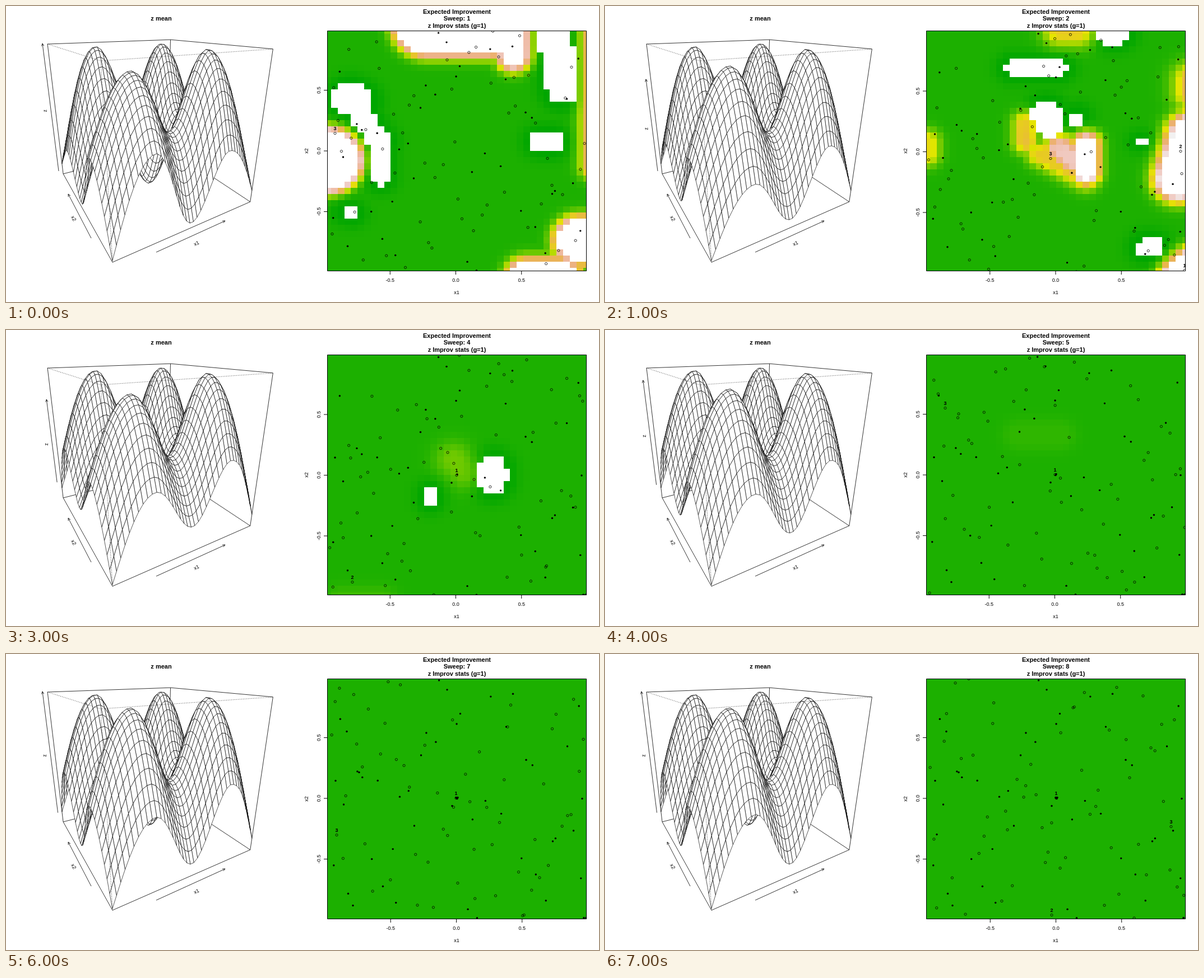
An HTML page with a canvas that plays this animation: 1058 by 529 pixels, repeating every 8 s.

```html
<!DOCTYPE html>
<html lang="en">
<head>
<meta charset="utf-8">
<title>Expected Improvement</title>
<style>
html, body { margin: 0; width: 100%; height: 100%; overflow: hidden; background: #fff; }
canvas { display: block; }
</style>
</head>
<body>
<canvas id="stage" width="1058" height="529"></canvas>
<script>
const ctx = document.getElementById('stage').getContext('2d');
const SANS = '"Liberation Sans", Arial, sans-serif';
const PLOT = { x: 574, y: 44, w: 461.5, h: 430 };
const CELLS = 39;

// Regions of the map are capsules from one cell to another, with a radius.
const hole = (c0, r0, c1, r1, radius) => ({ c0, r0, c1, r1, radius, hollow: true });
const glow = (c0, r0, c1, r1, radius, level = 1, fade = 1.7) => ({ c0, r0, c1, r1, radius, level, fade });

// arch, valley, peak: heights of the front of the surface; arrow: drawn part of the z axis;
// shift: axis offset; ranks: best candidates of the sweep.
const SWEEPS = [
  { arch: .09, valley: -.93, peak: .81, arrow: [0, 1], shift: [0, 0],
    ranks: [['3', 587, 219]],
    regions: [
      hole(3.4, 11, 4.4, 11.5, 2.6), hole(4.5, 13, 7.8, 18, 1.6), hole(8, 18, 8, 24, 1.1),
      hole(34, 0, 35.5, 9.5, 2.5), hole(32.2, 18, 33.8, 18, 1.6), hole(2.7, 29.4, 3.7, 29.7, .8),
      glow(15, -1, 24, -1, 4), glow(28, 0, 28, 4, 1.2), glow(0, 21, 0, 21, 4.4, 1, 1.4),
      glow(40, 0, 40, 22, .5, .65), glow(38, 34, 41, 34, 2.7), glow(30, 40, 35, 40, 1.8)] },
  { arch: -.25, valley: -.88, peak: .86, arrow: [0, .72], shift: [1.5, 1.5],
    ranks: [['3', 795, 264], ['2', 1027, 251], ['1', 1034, 464]],
    regions: [
      hole(27.5, 0, 28.5, 0, 2.1), hole(13, 6, 20, 6, 1.2), hole(18, 13.5, 18.4, 15, 2.2),
      hole(22.7, 14, 22.7, 15, 1), hole(33, 35.2, 34.2, 35.2, 1.5), hole(32, 18, 33, 18, .4),
      glow(24, 18.5, 24, 23, .8, 1, 1.6), glow(20, 19, 22, 21, .8, .82), glow(15, 15, 15, 18, .5, .55),
      glow(17, 20, 24, 24, .5, .5), glow(40, 17, 38, 24, 2.3, 1, 2), glow(41, 40, 40, 41, 3.8),
      glow(40, 8, 40, 10, .5, .6, 2.5), glow(20, 0, 23, 0, .5, .5, 2.2), glow(0, 18, 0, 20, .5, .45)] },
  { arch: -.08, valley: -.94, peak: .95, arrow: [0, 1], shift: [.5, -1.5],
    ranks: [['1', 805, 249], ['3', 1030, 464]],
    regions: [
      hole(14, -1, 14.4, 3, 2), hole(34.5, 4.2, 40, 9.2, 2.6), hole(27.3, 17.5, 28.5, 17.5, 4.7),
      glow(12, 16, 21, 16, 1.1, 1, 1.1), glow(17, 18, 20, 21, 1.2, 1, 1.1), glow(17, 23.5, 21, 23.5, .7, 1, 1.2),
      glow(21, 0, 22.5, 0, .7, .55, 2.2), glow(37, 0, 40, 0, .3, .6), glow(40, 40, 40, 40, 1, .5, 3.4)] },
  { arch: -.07, valley: -.65, peak: .82, arrow: [.1, .75], shift: [0, .5],
    ranks: [['1', 804, 251], ['2', 618, 442]],
    regions: [
      hole(24.8, 18.5, 24.8, 20.5, 2.2), hole(15.5, 22.4, 15.5, 23.6, .8),
      glow(19, 17, 21, 19, .5, .2, 2.5), glow(2, 40, 8, 40, .5, .09, 2)] },
  { arch: -.09, valley: -.73, peak: .87, arrow: [.08, .9], shift: [0, 0],
    ranks: [['1', 803, 250], ['3', 607, 131]],
    regions: [glow(14, 13, 20, 13, 1, .05)] },
  { arch: -.11, valley: -.83, peak: .92, arrow: [.05, 1], shift: [0, -1.5],
    ranks: [['2', 802, 249], ['3', 629, 204]],
    regions: [hole(32, 3, 32, 3, .5), glow(39, 3, 39, 9, 0, .32, 1.6), glow(14, 13, 20, 13, 1, .06)] },
  { arch: -.08, valley: -.83, peak: .92, arrow: [.05, 1], shift: [1, -1],
    ranks: [['1', 803, 249], ['3', 590, 315]], regions: [] },
  { arch: -.05, valley: -.83, peak: .92, arrow: [.05, 1], shift: [2, -1],
    ranks: [['1', 805, 249], ['2', 797, 458], ['3', 1010, 300]], regions: [] }
];

const mix = (a, b, t) => a + (b - a) * t;

function line(points, width = 1, dash = []) {
  ctx.lineWidth = width;
  ctx.setLineDash(dash);
  ctx.beginPath();
  points.forEach(p => ctx.lineTo(...p));
  ctx.stroke();
  ctx.setLineDash([]);
}

function text(label, x, y, { size = 9, bold = false, angle = 0 } = {}) {
  ctx.save();
  ctx.translate(x, y);
  ctx.rotate(angle);
  ctx.font = `${bold ? 'bold ' : ''}${size}px ${SANS}`;
  ctx.textAlign = 'center';
  ctx.fillStyle = '#000';
  ctx.fillText(label, 0, 0);
  ctx.restore();
}

function arrow(x0, y0, x1, y1) {
  const a = Math.atan2(y1 - y0, x1 - x0);
  const barb = s => [x1 - 5 * Math.cos(a + s), y1 - 5 * Math.sin(a + s)];
  line([[x0, y0], [x1, y1]], .8);
  line([barb(.45), [x1, y1], barb(-.45)], .8);
}

// Perspective view turned 30 degrees and tilted 20 degrees; axes run from -1 to 1.
const SIN_T = .5, COS_T = Math.sqrt(3) / 2;
const SIN_P = Math.sin(Math.PI / 9), COS_P = Math.cos(Math.PI / 9);
function project(x, y, z) {
  const away = x * SIN_T + y * COS_T;
  const scale = 494 / (2 + Math.sqrt(3) - z * SIN_P + away * COS_P);
  return [254.8 + (x * COS_T - y * SIN_T) * scale, 208.9 - (z * COS_P + away * SIN_P) * scale];
}

// Weights of the centre, ridge (at half way) and edge along one axis.
function weights(x) {
  const d = Math.abs(x);
  if (d < .5) {
    const ridge = (1 - Math.cos(2 * Math.PI * d)) / 2;
    return [1 - ridge, ridge, 0];
  }
  const ridge = Math.cos(Math.PI * (d - .5));
  return [0, ridge, 1 - ridge];
}

function surfaceHeight({ arch, valley, peak }, index) {
  const late = Math.min(1, index / 3);
  return (x, y) => {
    const [cx, rx, ex] = weights(x), [cy, ry, ey] = weights(y);
    const front = y < 0, left = x < 0;
    const frontArch = left ? arch : mix(-.12, .06, late);
    const sideArch = left && !front ? mix(-.4, 0, late) : -.05;
    const corner = front && left ? -.98 : -.82;
    return cx * cy * valley + (cx * ry + rx * cy) * .04 + rx * ry * (front && left ? peak : .98)
      + cx * ey * valley + ex * cy * (left ? valley : -.8)
      + rx * ey * (front ? frontArch : 0) + ex * ry * sideArch + ex * ey * corner;
  };
}

function drawSurface(sweep, index) {
  const box = (...corners) => corners.map(c => project(...c));
  text('z mean', 277, 26, { size: 11, bold: true });
  ctx.strokeStyle = '#000';
  line(box([-1,-1,-1], [1,-1,-1], [1,1,-1], [-1,1,-1], [-1,-1,-1]), .8);
  line(box([-1,1,-1], [-1,1,1], [1,1,1], [1,-1,1], [1,-1,-1]), .8);
  line(box([1,1,-1], [1,1,1]), .8);

  const height = surfaceHeight(sweep, index);
  const at = (i, j) => {
    const x = 2 * i / CELLS - 1, y = 2 * j / CELLS - 1;
    return project(x, y, height(x, y));
  };
  ctx.fillStyle = '#fff';
  ctx.lineWidth = .65;
  ctx.lineJoin = 'round';
  for (let j = CELLS - 1; j >= 0; j--) {
    for (let i = CELLS - 1; i >= 0; i--) {
      ctx.beginPath();
      [at(i, j), at(i + 1, j), at(i + 1, j + 1), at(i, j + 1)].forEach(p => ctx.lineTo(...p));
      ctx.closePath();
      ctx.fill();
      ctx.stroke();
    }
  }
  line(box([-1,-1,-1], [-1,-1,1]), .8, [1, 2]);
  line(box([-1,1,1], [-1,-1,1], [1,-1,1]), .8, [1, 2]);

  arrow(268, 440, 391, 384);
  text('x1', 341, 427, { angle: -.427 });
  arrow(152, 415, 111, 336);
  text('x2', 118, 381, { angle: 1.09 });
  const [from, to] = sweep.arrow.map(t => [mix(94, 65, t), mix(295, 67, t)]);
  arrow(...from, ...to);
  text('z', (from[0] + to[0]) / 2 - 7, (from[1] + to[1]) / 2 + 6, { angle: -1.7 });
}

// Green to yellow to pale pink.
function terrain(v) {
  if (v >= 1) return '#fff';
  const low = v < .5, t = low ? v * 2 : v * 2 - 1;
  const value = low ? .65 + .25 * t : .9 + .05 * t;
  const rgb = low ? [value * t, value, 0] : [value, mix(value, value * t, t), value * t];
  return `rgb(${rgb.map(k => Math.round(k * 255))})`;
}

function distance({ c0, r0, c1, r1, radius }, c, r) {
  const dc = c1 - c0, dr = r1 - r0;
  const along = ((c - c0) * dc + (r - r0) * dr) / (dc * dc + dr * dr || 1);
  const t = Math.min(1, Math.max(0, along));
  return Math.max(0, Math.hypot(c - c0 - t * dc, r - r0 - t * dr) - radius);
}

// Cells next to a hole are darker, cells next to a glow fade back to green.
function cellLevel(regions, c, r) {
  let dark = 0, hot = 0;
  for (const region of regions) {
    const d = distance(region, c, r);
    if (region.hollow && d === 0) return 1;
    if (region.hollow) dark = Math.max(dark, .08 * Math.exp(-((d / 1.7) ** 2)));
    else hot = Math.max(hot, region.level * Math.exp(-((d / region.fade) ** 2)));
  }
  return .08 + hot - dark;
}

function seeded(seed) {
  return () => {
    seed = seed + 0x6D2B79F5 | 0;
    let t = Math.imul(seed ^ seed >>> 15, 1 | seed);
    t = t + Math.imul(t ^ t >>> 7, 61 | t) ^ t;
    return ((t ^ t >>> 14) >>> 0) / 4294967296;
  };
}

// Latin hypercube: one point per row and per column.
function scatter(n, seed) {
  const random = seeded(seed);
  const rows = Array.from({ length: n }, (_, k) => [random(), k]).sort((a, b) => a[0] - b[0]);
  return rows.map(([, row], k) => [
    PLOT.x + (k + random()) / n * PLOT.w,
    PLOT.y + (row + random()) / n * PLOT.h
  ]);
}

function circle([x, y], solid) {
  ctx.beginPath();
  ctx.arc(x, y, solid ? 1.7 : 2.1, 0, 7);
  if (solid) ctx.fill(); else ctx.stroke();
}

const rankPoints = sweep => sweep.ranks.map(([, x, y]) => [x, y + 8.5]);

function drawMap(sweep, index) {
  const { x, y, w, h } = PLOT, [dx, dy] = sweep.shift;
  ['Expected Improvement', `Sweep: ${index + 1}`, 'z Improv stats (g=1)'].forEach((title, k) =>
    text(title, 804.5, 13.5 + 12.9 * k, { size: 11, bold: true }));

  ctx.save();
  ctx.beginPath();
  ctx.rect(x, y, w, h);
  ctx.clip();
  const edgeX = c => Math.round(x + (c - .5) * w / CELLS), edgeY = r => Math.round(y + (r - .5) * h / CELLS);
  for (let c = 0; c <= CELLS; c++) {
    for (let r = 0; r <= CELLS; r++) {
      ctx.fillStyle = terrain(cellLevel(sweep.regions, c, r));
      ctx.fillRect(edgeX(c), edgeY(r), edgeX(c + 1) - edgeX(c), edgeY(r + 1) - edgeY(r));
    }
  }

  // Evaluated points keep their place and gain the best candidates of earlier sweeps.
  ctx.fillStyle = '#000';
  ctx.lineWidth = .8;
  const evaluated = [...scatter(40, 11), ...SWEEPS.slice(0, index).flatMap(rankPoints)];
  evaluated.forEach(([px, py]) => circle([px + dx, py + dy], true));
  const candidates = [...scatter(58, index * 97 + 5), ...rankPoints(sweep)];
  candidates.forEach(p => circle(p, false));
  sweep.ranks.forEach(([label, rx, ry]) => text(label, rx, ry + 3, { bold: true }));
  ctx.restore();

  ctx.lineWidth = 1;
  ctx.strokeRect(x - .5, y + .5, w + .5, h - 1);
  [-.5, 0, .5].forEach(v => {
    const tx = 802.5 + dx + v * 234.5, ty = 259 + dy - v * 217;
    line([[tx, y + h], [tx, y + h + 6]]);
    line([[x - 7, ty], [x, ty]]);
    text(v.toFixed(1), tx, 493);
    text(v.toFixed(1), 561, ty, { angle: -Math.PI / 2 });
  });
  text('x1', 804, 514.5);
  text('x2', 539, 259, { angle: -Math.PI / 2 });
}

let shown = -1;
function frame(now) {
  const index = Math.floor(now / 1000) % SWEEPS.length;
  if (index !== shown) {
    shown = index;
    ctx.fillStyle = '#fff';
    ctx.fillRect(0, 0, 1058, 529);
    drawSurface(SWEEPS[index], index);
    drawMap(SWEEPS[index], index);
  }
  requestAnimationFrame(frame);
}
frame(performance.now());
</script>
</body>
</html>
```
